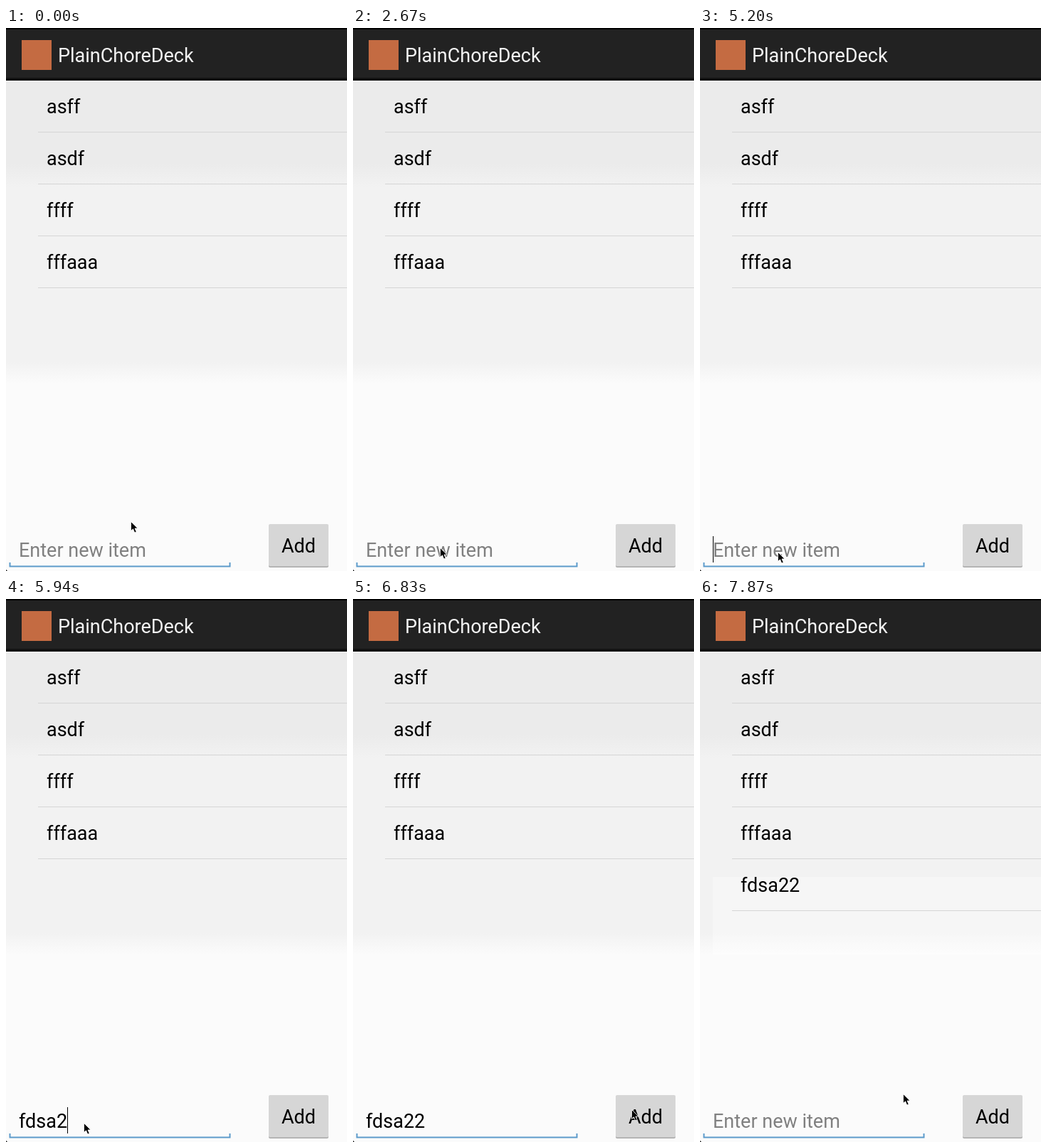
An HTML page that plays this animation: 479x764 px, repeating every 8000 ms.

```html
<!DOCTYPE html>
<html lang="en">
<head>
<meta charset="utf-8">
<title>Todo list</title>
<style>
  html, body { margin: 0; width: 100%; height: 100%; overflow: hidden; background: #fbfbfb; }
  svg { display: block; width: 479px; height: 764px; }
  text { font: 27px Roboto, sans-serif; white-space: pre; }
</style>
</head>
<body>
<svg viewBox="0 0 479 764">
  <defs>
    <linearGradient id="page" gradientUnits="userSpaceOnUse" x1="0" y1="0" x2="0" y2="764">
      <stop offset=".25" stop-color="#ebebeb"/>
      <stop offset=".293" stop-color="#f2f2f2"/>
      <stop offset=".615" stop-color="#f2f2f2"/>
      <stop offset=".655" stop-color="#fbfbfb"/>
    </linearGradient>
  </defs>
  <rect width="479" height="764" fill="url(#page)"/>

  <rect width="479" height="74" fill="#111"/>
  <rect width="479" height="2" fill="#000"/>
  <rect y="2" width="479" height="68" fill="#222"/>
  <rect x="22" y="17" width="42" height="42" fill="#c46b42"/>
  <text x="73" y="48" fill="#f3f3f3">PlainChoreDeck</text>

  <rect id="sheen" x="18" y="391" width="461" height="109" fill="#fff" opacity=".3"/>
  <g id="list"></g>

  <path d="M5.5 752V757.5H314.5V752" fill="none" stroke="#5d9bcb" stroke-width="2"/>
  <text id="field" x="18" y="744"></text>
  <rect id="caret" y="715" width="1" height="37"/>

  <rect x="369" y="699" width="84" height="60" rx="2" fill="#a8a8a8"/>
  <rect x="369" y="698" width="84" height="59.5" rx="2" fill="#d6d6d6"/>
  <text x="387" y="738">Add</text>
  <path d="M0 761.5Q.5 763.5 2.5 764H0Z"/>

  <path id="mouse" d="M.5 .5V13.5L3.5 10.8L5.7 16L8.2 15L6 10H10Z" stroke="#fff" stroke-width=".8"/>
</svg>
<script>
const LOOP = 8000;
const HINT = "Enter new item";
const ITEMS = ["asff", "asdf", "ffff", "fffaaa", "fdsa22"];
const ADDED_AT = 6980;

// Each row: start time in ms, then the value held from there on.
const mouseSteps = [
  [0, 175, 694], [750, 145, 711], [890, 119, 724], [1190, 121, 728], [1340, 122, 731],
  [4460, 118, 734], [4600, 109, 737],
  [6230, 168, 736], [6380, 262, 728], [6530, 358, 719], [6680, 391, 718],
  [7720, 359, 697], [7870, 285, 696]
];
const typeSteps = [
  [0, ""], [5340, "f"], [5490, "fd"], [5640, "fdsa"], [5940, "fdsa2"], [6090, "fdsa22"], [ADDED_AT, ""]
];
const caretToggles = [150, 600, 1190, 1630, 2080, 2670, 3120, 3710, 4160, 4750, 5200, 6680, 6980, 7420];

const byId = id => document.getElementById(id);
const [sheen, list, field, caret, mouse] = ["sheen", "list", "field", "caret", "mouse"].map(byId);
const show = (el, on) => el.setAttribute("visibility", on ? "visible" : "hidden");
const valueAt = (steps, t) => steps.findLast(step => step[0] <= t).slice(1);

list.innerHTML = ITEMS.map((item, i) => `<g transform="translate(0 ${i * 73})">
  <text x="57" y="120">${item}</text>
  <rect x="45" y="146" width="434" height="1" fill="#d5d5d5"/></g>`).join("");

function draw(t) {
  const [typed] = valueAt(typeSteps, t);
  const content = typed || HINT;
  if (field.textContent !== content) field.textContent = content;
  field.setAttribute("fill", typed ? "#000" : "#808080");

  caret.setAttribute("x", 18 + (typed ? Math.round(field.getComputedTextLength()) : 0));
  show(caret, caretToggles.filter(time => time <= t).length % 2);

  show(sheen, t >= ADDED_AT);
  show(list.lastElementChild, t >= ADDED_AT);
  mouse.setAttribute("transform", `translate(${valueAt(mouseSteps, t)})`);
}

const start = performance.now();
function frame(now) {
  draw(Math.max(0, now - start) % LOOP);
  requestAnimationFrame(frame);
}
draw(0);
requestAnimationFrame(frame);
</script>
</body>
</html>
```
